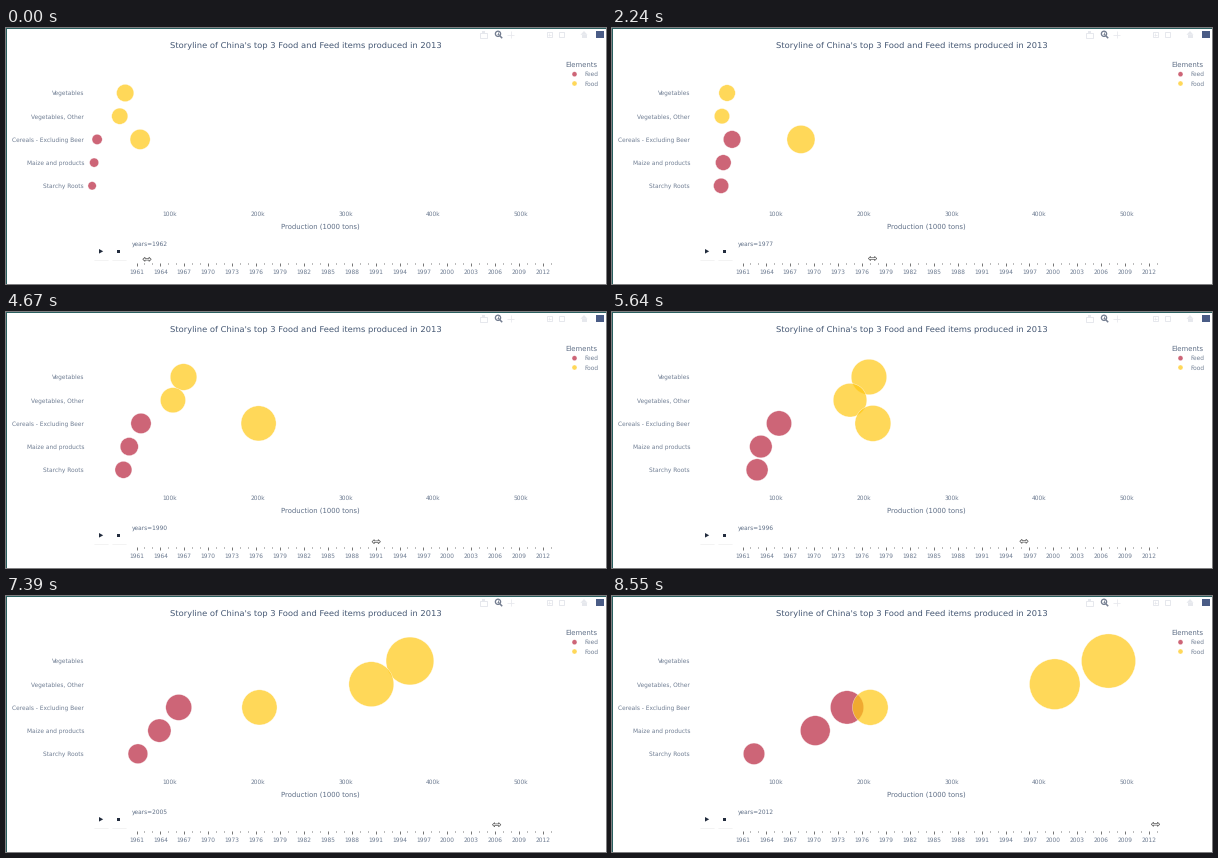
Recreate the animation shown at these times as a matplotlib script. Size 600x256 px, loop 8580 ms.

```python
import numpy as np
import matplotlib.pyplot as plt
from matplotlib.animation import FuncAnimation
from matplotlib.patches import Circle, Polygon, Rectangle

W, H, DPI = 600, 256, 100
PX = 72 / DPI
STEP_MS, FRAMES = 30, 286
SMALL, MEDIUM, LARGE = 5.83, 6.83, 8.33
INK, RED, GOLD = "#2a3f5f", "#b9243e", "#ffc813"
PALE, ACTIVE = "#e6e8ed", "#737d90"

plt.rcParams["font.family"] = "DejaVu Sans"
plt.rcParams["text.hinting"] = "none"
fig = plt.figure(figsize=(W / DPI, H / DPI), dpi=DPI, facecolor="white")
ax = fig.add_axes([0, 0, 1, 1])
ax.set(xlim=(0, W), ylim=(H, 0))
ax.axis("off")


def label(x, y, s, size=SMALL, ha="center", alpha=0.68):
    """Text whose capitals are centred on y, size in pixels."""
    return ax.text(x, y + 0.36 * size, s, fontsize=size * PX, color=INK,
                   ha=ha, va="baseline", alpha=alpha)


def line(xs, ys, color, width=1.0):
    ax.plot(xs, ys, color=color, lw=width * PX, solid_capstyle="butt")


def box(x, y, w, h, color, filled=True):
    ax.add_patch(Rectangle((x, y), w, h, fc=color if filled else "none",
                           ec="none" if filled else color, lw=PX))


def plus(x, y, r, color):
    line([x - r, x + r], [y, y], color, 0.8)
    line([x, x], [y - r, y + r], color, 0.8)


def dot(x, y, r, color):
    return ax.add_patch(Circle((x, y), r, fc=color, ec="white",
                               lw=0.45 * PX, alpha=0.7, zorder=3))


def value_x(v):
    return 76.2 + 0.8775 * v


def year_x(year):
    return 130.5 + 7.97 * (year - 1961)


# Page edges
box(0, 0, W, 1, "#2a6060")
box(0, 0, 0.8, H, "#2a6060")

# Toolbar
box(473.5, 4.5, 7, 5, PALE, False)
box(475.5, 3, 3, 1.5, PALE)
ax.add_patch(Circle((492, 5.8), 2.6, fc="none", ec=ACTIVE, lw=1.3 * PX))
line([493.8, 496.2], [7.8, 10.2], ACTIVE, 1.5)
plus(492, 5.8, 1.4, ACTIVE)
plus(504.5, 6.5, 3.5, PALE)
for x in (543, 555):
    box(x - 2.5, 3.8, 5, 5.4, PALE, False)
plus(543, 6.5, 1.5, PALE)
ax.add_patch(Polygon([(574.5, 6.8), (578, 3), (581.5, 6.8)], fc=PALE))
box(575.5, 6.5, 5, 3.2, PALE)
box(590, 2.5, 7.5, 7.5, "#4a5c86")

# Chart text
label(300.3, 16, "Storyline of China's top 3 Food and Feed items produced in 2013",
      LARGE, alpha=0.88)
names = ["Vegetables", "Vegetables, Other", "Cereals - Excluding Beer",
         "Maize and products", "Starchy Roots"]
row_y = {name: 65 + 23.2 * i for i, name in enumerate(names)}
for name, y in row_y.items():
    label(78, y, name, ha="right")
for k in range(100, 501, 100):
    label(value_x(k), 185.5, f"{k}k")
label(314, 198.5, "Production (1000 tons)", MEDIUM, alpha=0.75)

# Legend
label(559.5, 36.5, "Elements", MEDIUM, "left", 0.75)
for name, y, color in (("Feed", 46.2, RED), ("Food", 55.5, GOLD)):
    dot(568.5, y, 2.5, color)
    label(578, y, name, ha="left")

# Buttons and slider
for x in (88, 105.5):
    line([x, x + 14], [231.5, 231.5], "#f3f3f3")
ax.add_patch(Polygon([(93, 221), (97.2, 223.3), (93, 225.6)], fc="#222c3d"))
box(110.8, 221.5, 3.6, 3.6, "#222c3d")
for year in range(1961, 2014):
    major = (year - 1961) % 3 == 0
    line([year_x(year)] * 2, [234.8, 238 if major else 236.4], "#555555", 0.8)
    if major:
        label(year_x(year), 243.5, str(year))
year_text = label(126, 216, "", ha="left", alpha=0.75)

# Turning points of production, in thousand tons
KEY_YEARS = [1962, 1977, 1985, 1990, 1996, 2005, 2012]


def production(year):
    """Amounts for the feed bubbles, then the food bubbles."""
    def at(*values):
        return np.interp(year, KEY_YEARS, values)

    feed = at(17, 50, 58, 67, 103.5, 110, 181)
    roots = at(11.3, 37.5, 43, 47, 78.5, 63.5, 75)
    veg = at(49, 44.3, 83, 115.5, 206, 373.5, 479)
    cereals = at(66, 128.5, 188, 201, 210.5, 202, 207.5)
    other = 0.93 * veg - 1.1e-4 * veg ** 2 - 2.5
    return feed, 0.8 * feed, roots, veg, other, cereals


bubbles = ([dot(0, row_y[n], 1, RED) for n in names[2:]]
           + [dot(0, row_y[n], 1, GOLD) for n in names[:3]])

# Resize cursor dragging the slider
head = np.array([(2, 0.8), (2, 2.1), (4.2, 0), (2, -2.1), (2, -0.8)])
ARROW = np.vstack([head, -head])
cursor = ax.add_patch(Polygon(ARROW, fc="white", ec="#555555",
                              lw=0.7 * PX, zorder=5))
DRAG = [(0, 141), (1760, 230.5), (2640, 288), (3550, 328.3),
        (4670, 371), (5640, 412), (8550, 543.5)]


def update(i):
    t = i * STEP_MS
    x = np.interp(t, *zip(*DRAG))
    y = 231.3 - 3 * t / 8550
    cursor.set_xy(ARROW + (x, y))
    year = 1961 + int((x - 132.8) // 7.97)
    year_text.set_text(f"years={year}")
    for bubble, v in zip(bubbles, production(year)):
        bubble.center = value_x(v), bubble.center[1]
        bubble.radius = np.sqrt(1.53 * v)
    return [cursor, year_text, *bubbles]


anim = FuncAnimation(fig, update, frames=FRAMES, interval=STEP_MS,
                     repeat=True, repeat_delay=0, blit=False)
plt.show()
```
